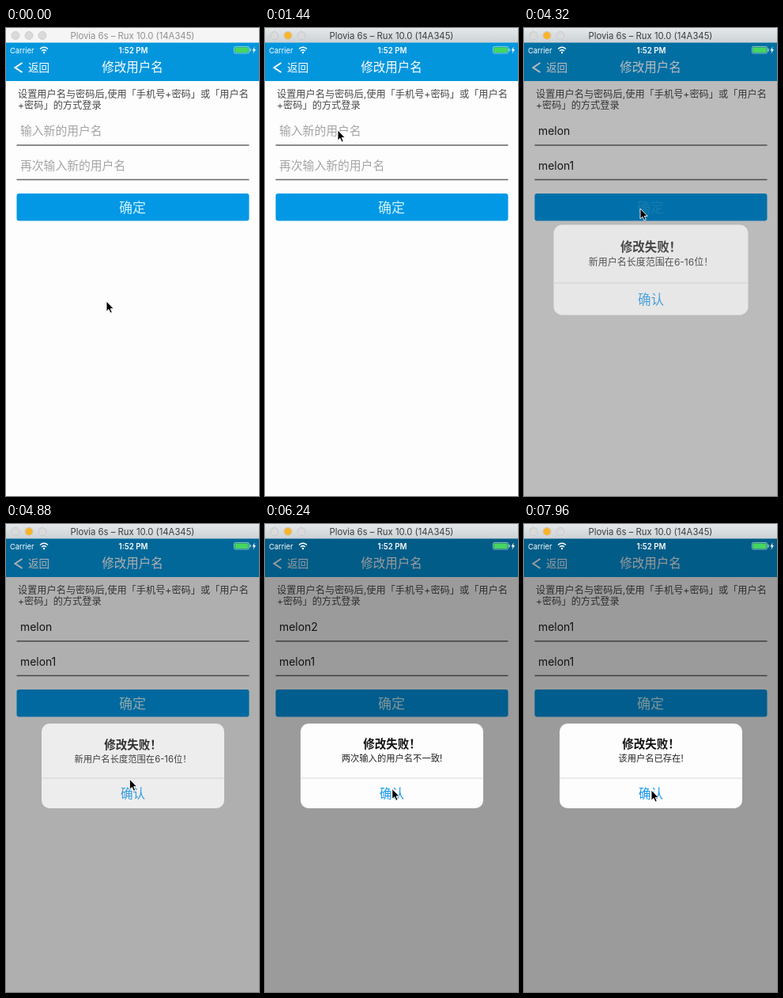
Write an HTML page that moves like this. It is 320 by 591 pixels and loops after 8000 ms.

```html
<!DOCTYPE html>
<html lang="zh-CN">
<head>
<meta charset="utf-8">
<style>
html, body { margin: 0; width: 320px; height: 591px; overflow: hidden; background: #fdfdfd; }
svg { display: block; font-family: Inter, "Noto Sans CJK SC", "Noto Sans CJK", sans-serif; }
.mid { text-anchor: middle; }
.bold { font-weight: 700; }
.medium { font-weight: 500; }
.field { font-size: 13.9px; }
.hint { font-size: 14.8px; fill: #a4a4a4; }
</style>
</head>
<body>
<svg width="320" height="591" viewBox="0 0 320 591">
  <defs>
    <linearGradient id="bar" x2="0" y2="1">
      <stop stop-color="#e4e8ea"/><stop offset="1" stop-color="#ccd2d6"/>
    </linearGradient>
  </defs>
  <rect width="320" height="591" fill="#fdfdfd"/>
  <rect y="18" width="320" height="49" fill="#0396dd"/>
  <path d="M20.500 44L11.500 50L20.500 56" fill="none" stroke="#fff" stroke-width="2"/>
  <text class="medium" x="28" y="55" font-size="13.500" fill="#fff">返回</text>
  <text class="mid medium" x="160" y="54.500" font-size="15.500" fill="#fff">修改用户名</text>
  <g font-size="12.200" fill="#484848">
    <text x="15" y="87.500">设置用户名与密码后,使用「手机号+密码」或「用户名</text>
    <text x="15" y="102">+密码」的方式登录</text>
  </g>
  <g id="fields"></g>
  <rect x="13.500" y="209" width="294" height="34.500" rx="3" fill="#0298e6"/>
  <text id="submit" class="mid" x="160" y="232.500" font-size="17">确定</text>
  <rect id="dim" y="18" width="320" height="573"/>

  <g fill="#fff">
    <text x="5" y="31.500" font-size="9.300">Carrier</text>
    <path d="M43 26.500Q48 22 53 26.500M45 29Q48 26.300 51 29" fill="none" stroke="#fff" stroke-width="1.500"/>
    <circle cx="48" cy="31" r="1.200"/>
    <text class="mid" x="161" y="31.500" font-size="9.700" font-weight="600">1:52 PM</text>
    <rect x="288.500" y="23.500" width="19" height="8.500" rx="1.500" fill="none" stroke="#b9e4c8" stroke-width=".7"/>
    <rect x="289.500" y="24.500" width="17" height="6.500" rx=".8" fill="#45d75f"/>
    <rect x="308.500" y="26" width="1.200" height="3.500" fill="#b9e4c8"/>
    <path d="M314.500 23.500L311.500 28.500H313.500L312.500 32.500L316 27H314z"/>
  </g>

  <rect id="titleBar" width="320" height="18.500"/>
  <g fill="#d9dadb" stroke="#c6c6c6" stroke-width=".8">
    <circle cx="12" cy="9.500" r="5"/><circle id="amber" cx="29" cy="9.500" r="5"/><circle cx="46" cy="9.500" r="5"/>
  </g>
  <text id="title" class="mid" x="160" y="13.500" font-size="11.300">Plovia 6s – Rux 10.0 (14A345)</text>

  <g id="alert">
    <rect x="45" y="252" width="231" height="107" rx="10" fill="#fdfdfd"/>
    <path d="M45 321H276" stroke="#dcdcdc"/>
    <text class="mid bold" x="160.500" y="283.500" font-size="14.500" fill="#111">修改失败！</text>
    <text id="msg" class="mid" x="160.500" y="300.500" font-size="11.300" fill="#222"></text>
    <text class="mid medium" x="160.500" y="346" font-size="15.500" fill="#1598ec">确认</text>
  </g>
  <path id="cursor" d="M0 0V13L3 10.300L5 15L7.200 14L5.200 9.500H9.200z" stroke="#fff" stroke-width=".9"/>
</svg>
<script>
const LOOP = 8000, TRAVEL = 260;
const $ = id => document.getElementById(id);
const set = (el, attrs) => { for (const k in attrs) el.setAttribute(k, attrs[k]); };
const clamp = v => Math.max(0, Math.min(1, v));
const smooth = u => u * u * (3 - 2 * u);
const typed = (text, t, start, step) => text.slice(0, Math.max(0, Math.floor((t - start) / step) + 1));

const spot = { rest: [127, 345], submit: [147, 228], ok: [161, 336], first: [92, 129], second: [100, 174] };

const alerts = [
  { in: 420, out: 960, msg: '请输入新的用户名!' },
  { in: 4180, out: 4820, msg: '新用户名长度范围在6-16位！' },
  { in: 5840, out: 6400, msg: '两次输入的用户名不一致!' },
  { in: 7540, out: LOOP, msg: '该用户名已存在!' }
];

// Each round: press the button, confirm the alert, return to the first field
const moves = alerts.flatMap(a => [
  { at: a.in - 340, to: spot.submit },
  { at: a.in + 160, to: spot.ok },
  { at: a.out + 20, to: spot.first }
]);
moves.push({ at: 2720, to: spot.second });
moves.sort((a, b) => a.at - b.at);

const taps = [{ at: 1800, field: 0 }, { at: 3200, field: 1 }, { at: 5160, field: 0 }, { at: 6720, field: 0 }];

const fields = [['输入新的用户名', 130], ['再次输入新的用户名', 173.5]].map(([hint, y]) => {
  const g = document.createElementNS('http://www.w3.org/2000/svg', 'g');
  g.setAttribute('transform', `translate(0 ${y})`);
  g.innerHTML = `<text class="hint" x="18" y="5">${hint}</text>
    <text class="field" x="18" y="5" fill="#1c1c1c"></text>
    <path d="M13.500 18H307.500" stroke="#666" stroke-width="1.400"/>
    <rect y="-8.500" width="1.200" height="17.500" fill="#666"/>
    <g><circle cx="294.500" cy=".5" r="6" fill="#c5c5ca"/>
    <path d="M292.300 -1.700L296.700 2.700M296.700 -1.700L292.300 2.700" stroke="#fff" stroke-width="1.200"/></g>`;
  $('fields').append(g);
  const [hintEl, value, , caret, clear] = g.children;
  return { hintEl, value, caret, clear };
});

function fieldText(t) {
  const first = t < 5400 ? typed('melon', t, 2120, 65)
    : t < 7080 ? 'melon2' : t < 7200 ? 'melon' : 'melon1';
  return [first, typed('melon1', t, 3400, 48)];
}

function focusedField(t) {
  const tap = taps.findLast(p => p.at <= t);
  const dropped = tap && alerts.some(a => a.in > tap.at && a.in <= t);
  return tap && !dropped ? tap.field : -1;
}

function drawFields(t) {
  const focus = focusedField(t);
  const blinkOff = t > 2760 && t < 3200;
  fieldText(t).forEach((text, i) => {
    const f = fields[i], on = focus === i;
    f.value.textContent = text;
    set(f.hintEl, { opacity: text ? 0 : 1 });
    set(f.caret, { x: 18 + f.value.getComputedTextLength(), opacity: on && !blinkOff ? 1 : 0 });
    set(f.clear, { opacity: on && text ? 1 : 0 });
  });
}

function drawAlert(t) {
  const a = alerts.findLast(a => a.in <= t) || alerts[0];
  const shown = 1 - (1 - clamp((t - a.in) / 450)) ** 3;
  const alpha = shown * (1 - clamp((t - a.out) / 300));
  const scale = 1.2 - .2 * shown;
  $('msg').textContent = a.msg;
  set($('alert'), { opacity: alpha, transform: `translate(160.5 305.5) scale(${scale}) translate(-160.5 -305.5)` });
  set($('dim'), { opacity: .39 * alpha });
  const pressed = alerts.some(a => t >= a.in - 100 && t < a.in + 160);
  set($('submit'), { fill: pressed ? '#1fa6e8' : '#cdf5f8' });
}

function drawWindow(t) {
  const active = t >= 320;
  set($('titleBar'), { fill: active ? 'url(#bar)' : '#f5f5f5' });
  set($('title'), { fill: active ? '#3c3c3c' : '#8f8f8f' });
  set($('amber'), { fill: active ? '#fbb52c' : '#d9dadb' });
}

function drawCursor(t) {
  let [x, y] = spot.rest;
  for (const { at, to } of moves) {
    const e = smooth(clamp((t - at) / TRAVEL));
    x += (to[0] - x) * e;
    y += (to[1] - y) * e;
  }
  set($('cursor'), { transform: `translate(${x} ${y})` });
}

function frame(now) {
  const t = now % LOOP;
  drawWindow(t);
  drawFields(t);
  drawAlert(t);
  drawCursor(t);
  requestAnimationFrame(frame);
}
frame(0);
</script>
</body>
</html>
```
